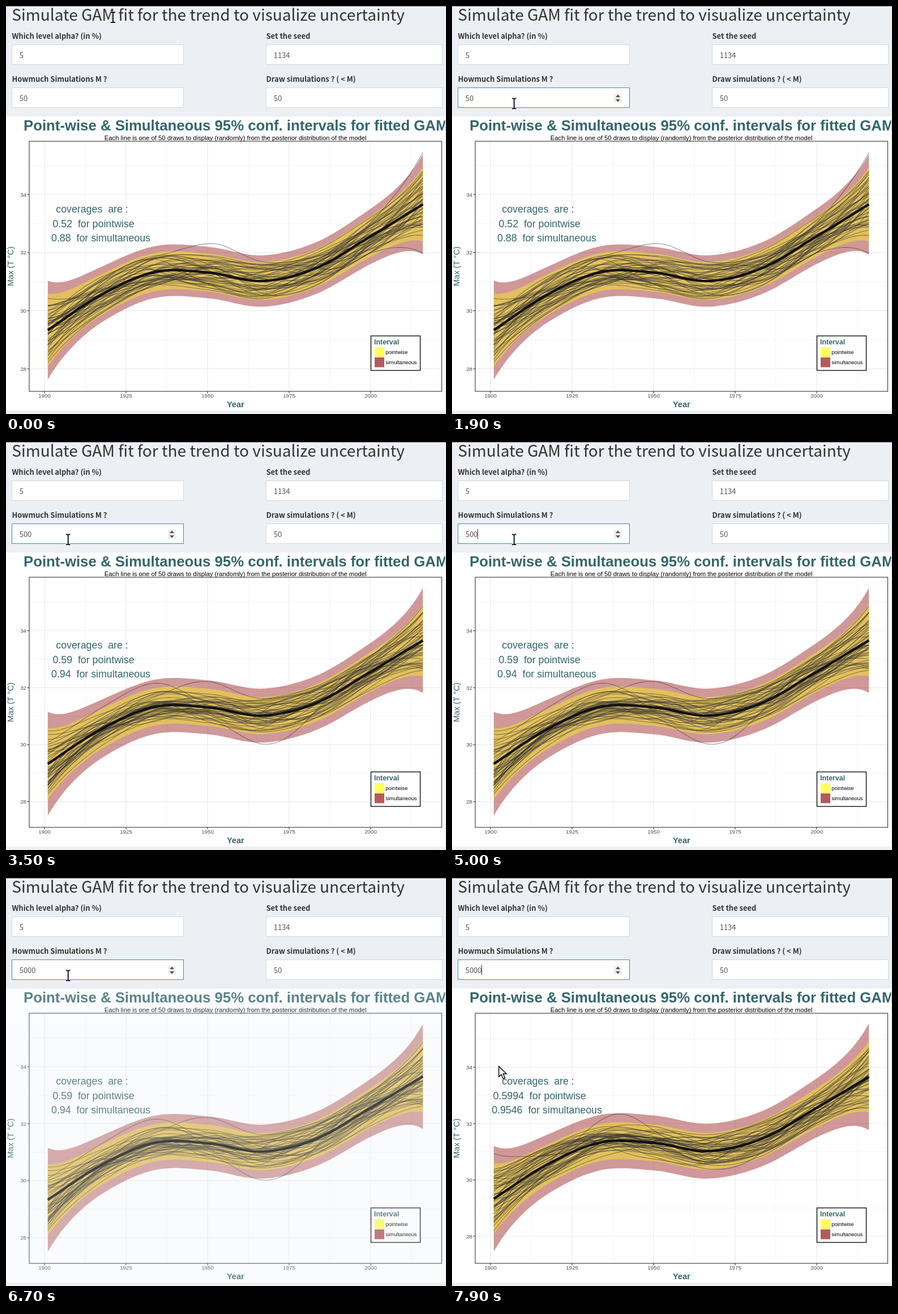
Animation of 777x721 px, one loop 8 s. Source, as an HTML page:

```html
<!DOCTYPE html>
<html lang="en">
<head>
<meta charset="utf-8">
<title>GAM simulation</title>
<style>
html, body { margin: 0; width: 100%; height: 100%; overflow: hidden; background: #ecf0f5; }
svg { display: block; width: 777px; height: 721px; }
.ui { font-family: "Noto Sans CJK JP", "Noto Sans CJK SC", "Noto Sans CJK", "Source Sans Pro", sans-serif; font-size: 12.97px; fill: #555; }
.ui .label { font-weight: 700; fill: #333; }
.ui .head { font-size: 28.05px; fill: #333; }
.plot { font-family: "Liberation Sans", Arial, sans-serif; }
.teal { fill: #33666c; }
.bold { font-weight: 700; }
.tick { font-size: 9.7px; fill: #4d4d4d; }
.draws { fill: none; stroke: #333; stroke-opacity: .52; stroke-width: 1.1; }
</style>
</head>
<body>
<svg id="stage" viewBox="0 0 777 721"></svg>
<script>
const LOOP = 8000, STEP = 100;
const PANEL = { x0: 41, x1: 769.5, y0: 239, y1: 681 };
const X0 = 73.8, X1 = 736.2, SAMPLES = 90;

// key values of the fitted trend, evenly spaced over the years
const MEAN = [29.33, 30.55, 31.33, 31.31, 31.02, 31.46, 32.53, 33.66];

// crit: simultaneous / pointwise width; bumps: [position, height] of the extreme draws
const CHARTS = [
  { y34: 333, unit: 51.35, crit: 1.36, seed: 11, cover: ["0.52", "0.88"], bumps: [[.45, 1.57], [1, 1.41], [1, -1.33]] },
  { y34: 333.5, unit: 50.35, crit: 1.456, seed: 29, cover: ["0.59", "0.94"], bumps: [[.26, 1.3], [.43, 1.39], [.59, -1.56]] },
  { y34: 334.5, unit: 49.75, crit: 1.5, seed: 47, cover: ["0.5994", "0.9546"], bumps: [[.335, 1.45], [0, 1.28], [.63, -1.07]] }
];

function rng(seed) {
  return () => {
    seed = (seed + 0x6d2b79f5) | 0;
    let r = Math.imul(seed ^ (seed >>> 15), 1 | seed);
    r = (r + Math.imul(r ^ (r >>> 7), 61 | r)) ^ r;
    return ((r ^ (r >>> 14)) >>> 0) / 4294967296;
  };
}

function spline(k, u) {
  const n = k.length - 1, i = Math.min(n - 1, Math.floor(u * n)), f = u * n - i;
  const b = k[i], c = k[i + 1];
  const a = i ? k[i - 1] : 2 * b - c;
  const d = i < n - 1 ? k[i + 2] : 2 * c - b;
  return b + .5 * f * (c - a + f * (2 * a - 5 * b + 4 * c - d + f * (3 * (b - c) + d - a)));
}

// pointwise half-width: constant inside, flaring at both ends
const half = u => .65 + .6 * Math.exp(-u / .06) + .615 * Math.exp((u - 1) / .055);

const text = (x, y, s, cls = "", more = "") => `<text x="${x}" y="${y}" class="${cls}" ${more}>${s}</text>`;
const sized = (px, anchor = "middle") => `font-size="${px}" text-anchor="${anchor}"`;
const rect = (x, y, w, h, more) => `<rect x="${x}" y="${y}" width="${w}" height="${h}" ${more}/>`;
const line = (x1, y1, x2, y2, color, w) =>
  `<line x1="${x1}" y1="${y1}" x2="${x2}" y2="${y2}" stroke="${color}" stroke-width="${w}"/>`;

// smooth random deviation, in pointwise half-widths
function deviation(rand, bump) {
  const waves = Array.from({ length: 4 }, () =>
    [(rand() + rand() + rand() + rand() - 2) * 13, rand() * 2 * Math.PI]);
  const base = u => 1.1 * Math.tanh(.34 * waves.reduce((s, [w, p]) => s + Math.cos(w * u + p), 0));
  if (!bump) return base;
  return u => {
    const g = Math.exp(-(((u - bump[0]) / .13) ** 2));
    return base(u) * (1 - g) + bump[1] * g;
  };
}

function chart(c) {
  const py = v => c.y34 + (34 - v) * c.unit;
  const curve = dev => Array.from({ length: SAMPLES + 1 }, (_, i) => {
    const u = i / SAMPLES;
    const v = spline(MEAN, u) + dev(u) * half(u);
    return (X0 + u * (X1 - X0)).toFixed(1) + "," + py(v).toFixed(1);
  });
  const ribbon = (k, fill) =>
    `<polygon points="${[...curve(() => k), ...curve(() => -k).reverse()].join(" ")}" fill="${fill}"/>`;

  const { x0, x1, y0, y1 } = PANEL;
  let out = "", ticks = "";
  for (let i = 0; i < 10; i++) {
    const x = 68 + i * 72;
    out += line(x, y0, x, y1, "#ebebeb", i % 2 ? .6 : 1.2);
    if (i % 2 === 0) ticks += line(x, y1, x, y1 + 3.5, "#333", 1.1) + text(x, 692.3, 1900 + i * 12.5, "tick", 'text-anchor="middle"');
  }
  for (let v = 28; v <= 35; v++) {
    const y = py(v);
    out += line(x0, y, x1, y, "#ebebeb", v % 2 ? .6 : 1.2);
    if (v % 2 === 0) ticks += line(x0 - 3.5, y, x0, y, "#333", 1.1) + text(36, y + 3.5, v, "tick", 'text-anchor="end"');
  }

  out += ribbon(c.crit, "rgba(161,50,50,.5)") + ribbon(1, "#e2c05c");
  const rand = rng(c.seed);
  out += '<g class="draws">';
  for (let i = 0; i < 50; i++) out += `<polyline points="${curve(deviation(rand, c.bumps[i])).join(" ")}"/>`;
  out += `</g><polyline points="${curve(() => 0).join(" ")}" fill="none" stroke="#111" stroke-width="4.4"/>`;

  const [point, simul] = c.cover;
  [[152, "coverages\u00a0 are :"], [154.6, point + "\u00a0 for pointwise"], [167.5, simul + "\u00a0 for simultaneous"]]
    .forEach(([x, s], i) => out += text(x, 365.3 + i * 25.5, s, "teal", sized(17.8)));
  out += rect(x0, y0, x1 - x0, y1 - y0, 'fill="none" stroke="#333" stroke-width="1.1"');
  return `<g class="chart">${out}${ticks}</g>`;
}

function frame() {
  const key = (y, fill, name) =>
    rect(651, y, 17, 17.3, `fill="${fill}"`) + text(670.3, y + 12.2, name, "", sized(9.4, "start"));
  return rect(644.5, 583, 87, 61, 'fill="#fff" stroke="#000" stroke-width="1.3"') +
    text(650, 598, "Interval", "teal bold", sized(12.4, "start")) +
    key(603, "#ffff5a", "pointwise") + key(621, "#b55b5b", "simultaneous") +
    text(405.7, 220, "Point-wise &amp; Simultaneous 95% conf. intervals for fitted GAM", "teal bold", sized(25.74)) +
    text(405.2, 237, "Each line is one of 50 draws to display (randomly) from the posterior distribution of the model", "", sized(11.27)) +
    text(405.3, 709, "Year", "teal bold", sized(14.5)) +
    text(0, 0, "Max (T °C)", "teal", sized(14.5) + ' transform="translate(13.3 460) rotate(-90)"');
}

function field(id, x, y, w, label, value) {
  return text(x, y - 10.7, label, "label") +
    rect(x, y, w, 35, `id="${id}Box" fill="#fff" stroke="#d2d6de"`) +
    text(x + 13.2, y + 23, value, "", `id="${id}"`);
}

const spinner = (id, y) => `<g id="${id}">${rect(286, y, 14, 16, 'fill="#efefef"')}` +
  `<path d="M289 ${y + 6}l4 -4.6l4 4.6zM289 ${y + 10}l4 4.6l4 -4.6z" fill="#505050"/></g>`;

const beam = "M-3.8 -9H-1.6Q0 -9 0 -7.4Q0 -9 1.6 -9H3.8M0 -8V8M-3.8 9H-1.6Q0 9 0 7.4Q0 9 1.6 9H3.8";

document.getElementById("stage").innerHTML =
  '<defs><clipPath id="page"><rect x="0" y="195" width="775.5" height="520"/></clipPath></defs>' +
  rect(0, 0, 777, 721, 'fill="#ecf0f5"') + rect(0, 0, 777, 1, 'fill="#85888c"') +
  '<g class="ui">' +
  text(10.3, 26.2, "Simulate GAM fit for the trend to visualize uncertainty", "head") +
  field("alpha", 10.5, 68.5, 303, "Which level alpha? (in %)", "5") +
  field("seed", 459.5, 68.5, 311, "Set the seed", "1134") +
  field("sims", 10.5, 144.5, 303, "Howmuch Simulations M ?", "50") +
  field("shown", 459.5, 144.5, 311, "Draw simulations ? ( &lt; M)", "50") +
  spinner("spinA", 79) + spinner("spinM", 155) +
  rect(0, 153.5, 1, 18, 'id="caret" fill="#333"') + "</g>" +
  '<g id="plot" class="plot" clip-path="url(#page)">' + rect(0, 195.5, 776, 519.5, 'fill="#fff"') +
  CHARTS.map(chart).join("") + frame() + "</g>" +
  `<g id="beam" fill="none"><path d="${beam}" stroke="#fff" stroke-width="3.6"/><path d="${beam}" stroke="#000" stroke-width="1.8"/></g>` +
  '<path id="arrow" d="M.7 1V19.2L5 15.2L8.3 22.8L11.6 21.4L8.4 14H14.2Z" fill="#fff" stroke="#000" stroke-width="1.4"/>';

const $ = id => document.getElementById(id);
const charts = document.querySelectorAll(".chart");

const clamp = u => Math.min(1, Math.max(0, u));
const progress = (t, from, to) => clamp((t - from) / (to - from));

// pointer moves: start, end, target x, target y, ease-out power
const HOME = [189, 20];
const MOVES = [[0, 300, 130, 93, 1], [400, 1100, 109.7, 172.3, 1.6], [7200, 7900, 82, 332, 4]];
const BLINKS = [1300, 1900, 2500, 3200, 3800, 4400, 5000, 6100, 6800, 7300, 7900];
const TYPED = [2600, 5500], REDRAWN = [3500, 6800];
const FADE = [6500, 6800], ARROW = 7300;

const passed = (times, t) => times.filter(s => s <= t).length;
const show = (el, on) => el.setAttribute("visibility", on ? "visible" : "hidden");

function pointer(t) {
  return MOVES.reduce(([x, y], [from, to, tx, ty, power]) => {
    const e = 1 - (1 - progress(t, from, to)) ** power;
    return [x + (tx - x) * e, y + (ty - y) * e];
  }, HOME);
}

function render(t) {
  const [x, y] = pointer(t), current = passed(REDRAWN, t);
  const value = "50" + "0".repeat(passed(TYPED, t));
  for (const id of ["beam", "arrow"]) $(id).setAttribute("transform", `translate(${x} ${y})`);
  show($("beam"), t < ARROW);
  show($("arrow"), t >= ARROW);
  show($("spinA"), y > 69 && y < 104);
  show($("spinM"), y > 144);
  if ($("sims").textContent !== value) $("sims").textContent = value;

  const focus = progress(t, 1300, 1500);
  const mix = (a, b) => Math.round(a + (b - a) * focus);
  $("simsBox").setAttribute("stroke", `rgb(${mix(210, 60)},${mix(214, 141)},${mix(222, 188)})`);
  $("caret").setAttribute("x", Math.floor(24 + value.length * 7.2));
  show($("caret"), passed(BLINKS, t) % 2);

  charts.forEach((g, i) => g.setAttribute("display", i === current ? "inline" : "none"));
  $("plot").setAttribute("opacity", t < FADE[1] ? 1 - .33 * progress(t, ...FADE) : 1);
}

const start = performance.now();
function tick() {
  const t = (performance.now() - start) % LOOP;
  render(Math.floor(t / STEP) * STEP);
  requestAnimationFrame(tick);
}
tick();
</script>
</body>
</html>
```
